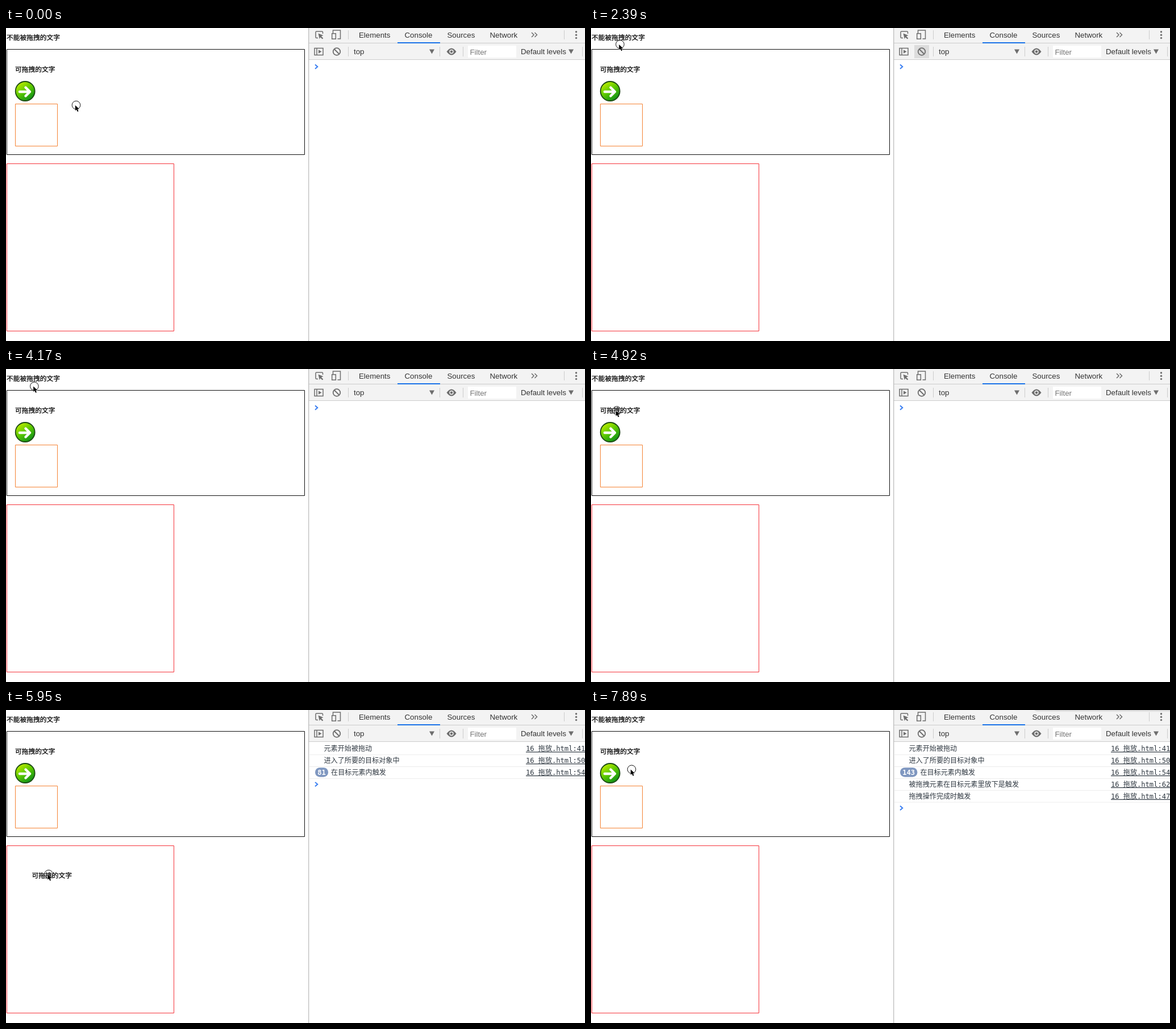
Animation of 1019 by 550 pixels, one loop 8000 ms. Source, as an HTML page:

```html
<!DOCTYPE html>
<html lang="zh-CN">
<head>
<meta charset="utf-8">
<style>
  html, body { margin: 0; width: 100%; height: 100%; overflow: hidden; background: #fff; }
  svg { display: block; }
  text { white-space: pre; }
  .page { font: 11.75px "Noto Sans CJK SC", "Noto Sans CJK", sans-serif; stroke: #000; stroke-width: .25; }
  .ui { font: 13.3px "Liberation Sans", Arial, sans-serif; fill: #333; }
  .log { font: 12.1px "DejaVu Sans Mono", "Noto Sans CJK SC", "Noto Sans CJK", monospace; fill: #303942; }
  .link { text-decoration: underline; }
  .badge { font-weight: bold; fill: #fff; text-anchor: middle; }
  .hint { fill: #757575; }
  .icon { fill: none; stroke: #6e6e6e; stroke-width: 1.5; }
  .solid { fill: #6e6e6e; }
</style>
</head>
<body>
<svg width="1019" height="550" viewBox="0 0 1019 550">
  <defs>
    <linearGradient id="green" x1=".1" y1="0" x2=".8" y2="1">
      <stop offset="0" stop-color="#d0f400"/>
      <stop offset=".5" stop-color="#5cc800"/>
      <stop offset="1" stop-color="#058a1c"/>
    </linearGradient>
    <linearGradient id="dim" x2="0" y2="1">
      <stop stop-color="#000" stop-opacity=".14"/>
      <stop offset="1" stop-color="#000" stop-opacity="0"/>
    </linearGradient>
  </defs>

  <g class="page">
    <text x="1" y="21.3">不能被拖拽的文字</text>
    <text x="16" y="77.3">可拖拽的文字</text>
  </g>
  <g fill="none">
    <path stroke="#111" d="M1.5 37.5h524v185h-524z"/>
    <path stroke="#f58233" d="M16.5 133.5h74v74h-74z"/>
    <path stroke="#f5333a" d="M1.5 238.5h294v294h-294z"/>
  </g>
  <circle cx="33.7" cy="111" r="17" fill="url(#green)" stroke="#1c4a12" stroke-width="1.8"/>
  <path d="M24 112H42M34.5 104.5L42 112L34.5 119.5" fill="none" stroke="#fff" stroke-width="4.4" stroke-linecap="round" stroke-linejoin="round"/>

  <path fill="#f3f3f3" d="M533 0h486v56H533z"/>
  <path fill="none" stroke="#ccc" d="M533 26.5h486M533 55.5h486M602.5 4v16M982.5 4v16M602.5 33v17M763.5 33v17M804.5 33v17M1014.5 33v17"/>
  <path stroke="#bdbdbd" stroke-width="1.3" d="M532.7 0v550"/>
  <path fill="#1a73e8" d="M689 25h75v2h-75z"/>
  <path fill="#fff" d="M813 31h85v21h-85z"/>
  <path id="hover" fill="#dcdcdc" d="M569 30h26v23h-26z"/>
  <g class="ui">
    <text x="621" y="16.8">Elements</text>
    <text x="701.5" y="16.8">Console</text>
    <text x="776.5" y="16.8">Sources</text>
    <text x="851.5" y="16.8">Network</text>
    <text x="612" y="46">top</text>
    <text x="816.5" y="46.5" class="hint">Filter</text>
    <text x="906" y="46">Default levels</text>
  </g>
  <g class="icon">
    <path d="M549 17.5h-2.5q-1.5 0-1.5-1.5V7.5q0-1.5 1.5-1.5H556q1.5 0 1.5 1.5V10"/>
    <path d="M575.5 9V4h13v15h-5M573.7 9.7h6.6v9.6h-6.6z"/>
    <path d="M925 8l4 4-4 4M930.5 8l4 4-4 4"/>
    <path d="M543 35.5h15v12h-15zM547 35.5v12"/>
    <path stroke-width="1.8" d="M577.6 37l9 9"/>
    <circle cx="582" cy="41.5" r="6.3" stroke-width="1.8"/>
  </g>
  <g class="solid">
    <path d="M549.5 9.5l9 3.6-3.6 1.5 3.4 3.4-1.6 1.6-3.4-3.4-1.5 3z"/>
    <path d="M550 38.3l5.5 3.2-5.5 3.2zM745 37.5h9l-4.5 8zM990 37.5h9l-4.5 8z"/>
    <circle cx="1003.5" cy="6.8" r="1.7"/>
    <circle cx="1003.5" cy="12.2" r="1.7"/>
    <circle cx="1003.5" cy="17.6" r="1.7"/>
    <path d="M775.5 41.5q8.5-12 17 0q-8.5 12-17 0z"/>
    <circle cx="784" cy="41.5" r="3" stroke="#f3f3f3" stroke-width="1.4"/>
  </g>
  <path id="shade" fill="url(#dim)" d="M780 0h240v4H786z"/>

  <g id="rows" class="log"></g>
  <path id="prompt" fill="none" stroke="#367cf1" stroke-width="1.9" d="M544 64.3l4.3 3.7-4.3 3.7"/>

  <text id="ghost" class="page" x="-29.5" y="6.5">可拖拽的文字</text>
  <g id="cursor">
    <circle r="7.3" fill="none" stroke="#111"/>
    <path d="M-1.7 .3v9.4l2.2-2 1.7 3.8 1.9-.8-1.7-3.7h3z" stroke="#fff" stroke-width=".7" paint-order="stroke"/>
  </g>
</svg>
<script>
const $ = id => document.getElementById(id);
const LOOP = 8000, ROW = 20.85;
const DRAG = 5510, ENTER = 5800, DROP = 6410;

// Each move: first step, last step, number of steps, key points of the path.
const moves = [
  [0, 0, 1, [123.5, 135.5]],
  [300, 660, 3, [98, 119], [68, 97]],
  [950, 1240, 3, [65, 78], [55, 33.5]],
  [1690, 2690, 7, [51, 25], [45, 17], [63, 52]],
  [2830, 2830, 1, [63, 36]],
  [3280, 4320, 8, [54, 55], [52, 66], [49, 16]],
  [4470, 4920, 4, [46, 28], [39.5, 55], [45.5, 73]],
  [5070, DRAG, 4, [45.5, 75], [64, 113]],
  [5650, 5950, 3, [71, 190], [75, 288.5]],
  [6710, 7000, 3, [112, 282], [227, 232.5]],
  [7150, 7300, 2, [152, 190], [99, 146]],
  [7600, 7890, 3, [90, 129], [71.5, 104.3]]
];

// Console lines: time of appearance, message, source line.
const logs = [
  [DRAG, "元素开始被拖动", 41],
  [ENTER, "进入了所要的目标对象中", 50],
  [ENTER, "在目标元素内触发", 54],
  [DROP, "被拖拽元素在目标元素里放下是触发", 62],
  [DROP, "拖拽操作完成时触发", 47]
];

$("rows").innerHTML = logs.map(([, message, line], i) => `<g transform="translate(0 ${i * ROW})">
  <path stroke="#ececec" d="M533 78.7h486"/>
  ${i == 2 ? '<rect id="pill" x="544" y="59.5" height="16.5" rx="8.25" fill="#7f97c0"/><text id="count" class="badge" y="72.3"/>' : ""}
  <text ${i == 2 ? 'id="repeat"' : ""} x="559.5" y="72.3">${message}</text>
  <text class="link" x="915" y="72.3">16 拖放.html:${line}</text></g>`).join("");

const show = (node, on) => node.setAttribute("visibility", on ? "visible" : "hidden");
const shift = (node, x, y) => node.setAttribute("transform", `translate(${x} ${y})`);

// The cursor jumps along its path in even steps and rests between moves.
function cursorAt(t) {
  const [from, to, steps, ...path] = moves.filter(move => move[0] <= t).pop();
  const last = steps - 1;
  const step = last && Math.min(last, Math.floor((t - from) / (to - from) * last + 0.05));
  const u = last && step / last * (path.length - 1);
  const a = path[Math.floor(u)], b = path[Math.ceil(u)];
  return a.map((v, i) => v + (b[i] - v) * (u % 1));
}

function draw(now) {
  const t = now % LOOP;
  const spot = cursorAt(t);
  shift($("cursor"), ...spot);
  shift($("ghost"), ...spot);
  shift($("shade"), 26 * Math.max(0, (7300 - t) / 300), 0);
  show($("ghost"), t >= DRAG && t < DROP);
  show($("hover"), t >= 2190 && t < 3430);
  show($("shade"), t >= 6860);

  logs.forEach(([start], i) => show($("rows").children[i], t >= start));
  shift($("prompt"), 0, logs.filter(([start]) => t >= start).length * ROW);

  const count = String(Math.min(143, 81 + 31 * Math.floor((t - 5950) / 155)));
  const width = 8.5 + 7.3 * count.length;
  $("count").textContent = count;
  $("count").setAttribute("x", 544 + width / 2);
  $("pill").setAttribute("width", width);
  $("repeat").setAttribute("x", 549 + width);
  requestAnimationFrame(draw);
}
requestAnimationFrame(draw);
</script>
</body>
</html>
```
